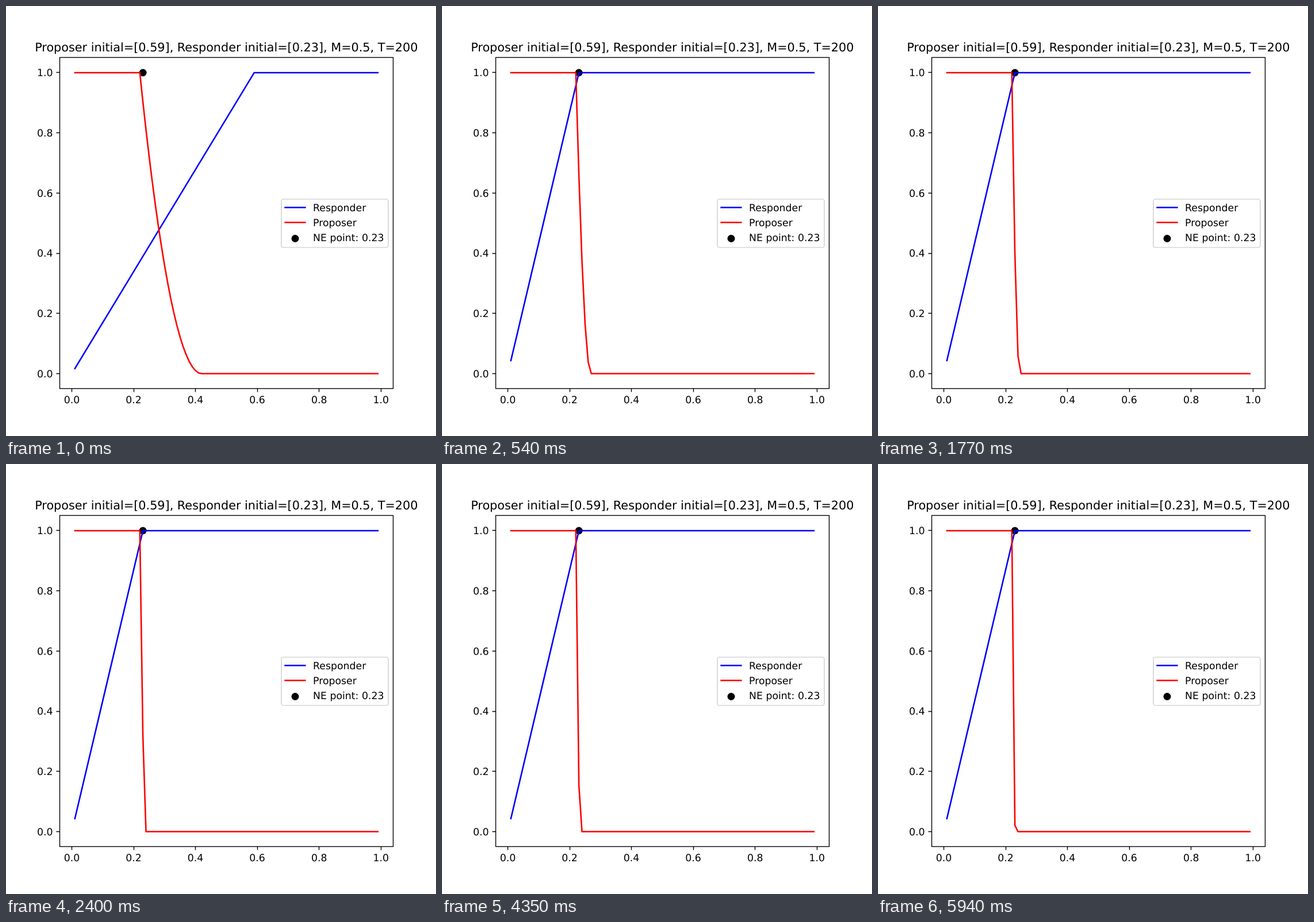
These frames come from a looping animation (748x748 px, 5970 ms). An HTML page:

```html
<!DOCTYPE html>
<html lang="en">
<head>
<meta charset="utf-8">
<title>Ultimatum game learning</title>
<style>
  html, body { margin: 0; width: 100%; height: 100%; overflow: hidden; background: #fff; }
  svg { display: block; width: 748px; height: 748px; }
  text { font-family: "DejaVu Sans", sans-serif; font-size: 17.315px; text-rendering: geometricPrecision; }
  .title { font-size: 20.778px; }
  .axis { fill: none; stroke: #000; stroke-width: 1.385; }
  .curve { fill: none; stroke-width: 2.597; stroke-linecap: square; stroke-linejoin: round; }
  .blue { stroke: #00f; }
  .red { stroke: #f00; }
</style>
</head>
<body>
<svg viewBox="0 0 748 748">
  <circle cx="238.16" cy="115.98" r="6.5"/>
  <path id="responder" class="curve blue"/>
  <path id="proposer" class="curve red"/>
  <g id="ticks"></g>
  <rect class="axis" x="93.5" y="89.5" width="580" height="576"/>
  <text class="title" x="383.35" y="79" text-anchor="middle">Proposer initial=[0.59], Responder initial=[0.23], M=0.5, T=200</text>
  <rect x="479" y="336" width="186" height="84" rx="3.46" fill="#fff" stroke="#d6d6d6" stroke-width="1.73"/>
  <path class="curve blue" d="M485.6 350.5H520.3"/>
  <path class="curve red" d="M485.6 376.5H520.3"/>
  <circle cx="503" cy="404.5" r="6.5"/>
  <text x="534.1" y="357">Responder</text>
  <text x="534.1" y="383">Proposer</text>
  <text x="534.1" y="409">NE point: 0.23</text>
</svg>
<script>
const STEP_MS = 30, STEPS = 199, N = 99, RATE = 0.5;
const OFFER = 59, THRESHOLD = 23; // opening moves, in hundredths

const px = v => 93.5 + (v + 0.039) / 1.078 * 579.7;
const py = v => 639.54 - v * 523.6;
const zeros = () => new Array(N + 1).fill(0);
const pure = k => zeros().map((_, i) => i === k ? 1 : 0);

// Nearest probability vector to the scaled payoffs (index 0 is unused).
function project(payoff) {
  const scaled = payoff.map(u => u * RATE);
  const sorted = scaled.slice(1).sort((a, b) => b - a);
  let sum = 0, cut = 0;
  sorted.forEach((v, i) => {
    sum += v;
    const c = (sum - 1) / (i + 1);
    if (v > c) cut = c;
  });
  return scaled.map((v, i) => i ? Math.max(0, v - cut) : 0);
}

function cumulate(p) {
  let sum = 0;
  return p.map(v => sum += v);
}

function toPath(values) {
  let d = "";
  for (let i = 1; i <= N; i++)
    d += (i > 1 ? "L" : "M") + px(i / 100).toFixed(2) + " " + py(values[i]).toFixed(2);
  return d;
}

// Both players follow the regularised leader against the other's past play.
function simulate() {
  const offerPay = zeros(), acceptPay = zeros(), poses = [];
  let offers = pure(OFFER), thresholds = pure(THRESHOLD);
  for (let t = 0; t < STEPS; t++) {
    const accepted = cumulate(thresholds);
    let gain = 0;
    for (let i = N; i > 0; i--) {
      offerPay[i] += (1 - i / 100) * accepted[i];
      gain += offers[i] * i / 100;
      acceptPay[i] += gain;
    }
    offers = project(offerPay);
    thresholds = project(acceptPay);
    poses.push({
      responder: toPath(cumulate(thresholds)),
      proposer: toPath(cumulate(offers).map(c => 1 - c))
    });
  }
  return poses;
}

function drawTicks() {
  let marks = "";
  for (let i = 0; i <= 5; i++) {
    const v = i / 5, label = v.toFixed(1);
    const x = Math.floor(px(v)) + 0.5, y = Math.floor(py(v)) + 0.5;
    marks += `<path class="axis" d="M${x} 665.5v6.06M93.5 ${y}h-6.06"/>
      <text x="${px(v)}" y="691" text-anchor="middle">${label}</text>
      <text x="81.4" y="${Math.round(py(v) + 6.3)}" text-anchor="end">${label}</text>`;
  }
  document.getElementById("ticks").innerHTML = marks;
}

const poses = simulate();
const responder = document.getElementById("responder");
const proposer = document.getElementById("proposer");
let shown = -1;

function show(k) {
  if (k === shown) return;
  shown = k;
  responder.setAttribute("d", poses[k].responder);
  proposer.setAttribute("d", poses[k].proposer);
}

drawTicks();
show(0);
const start = performance.now();
function tick() {
  show(Math.floor((performance.now() - start) / STEP_MS) % STEPS);
  requestAnimationFrame(tick);
}
requestAnimationFrame(tick);
</script>
</body>
</html>
```
